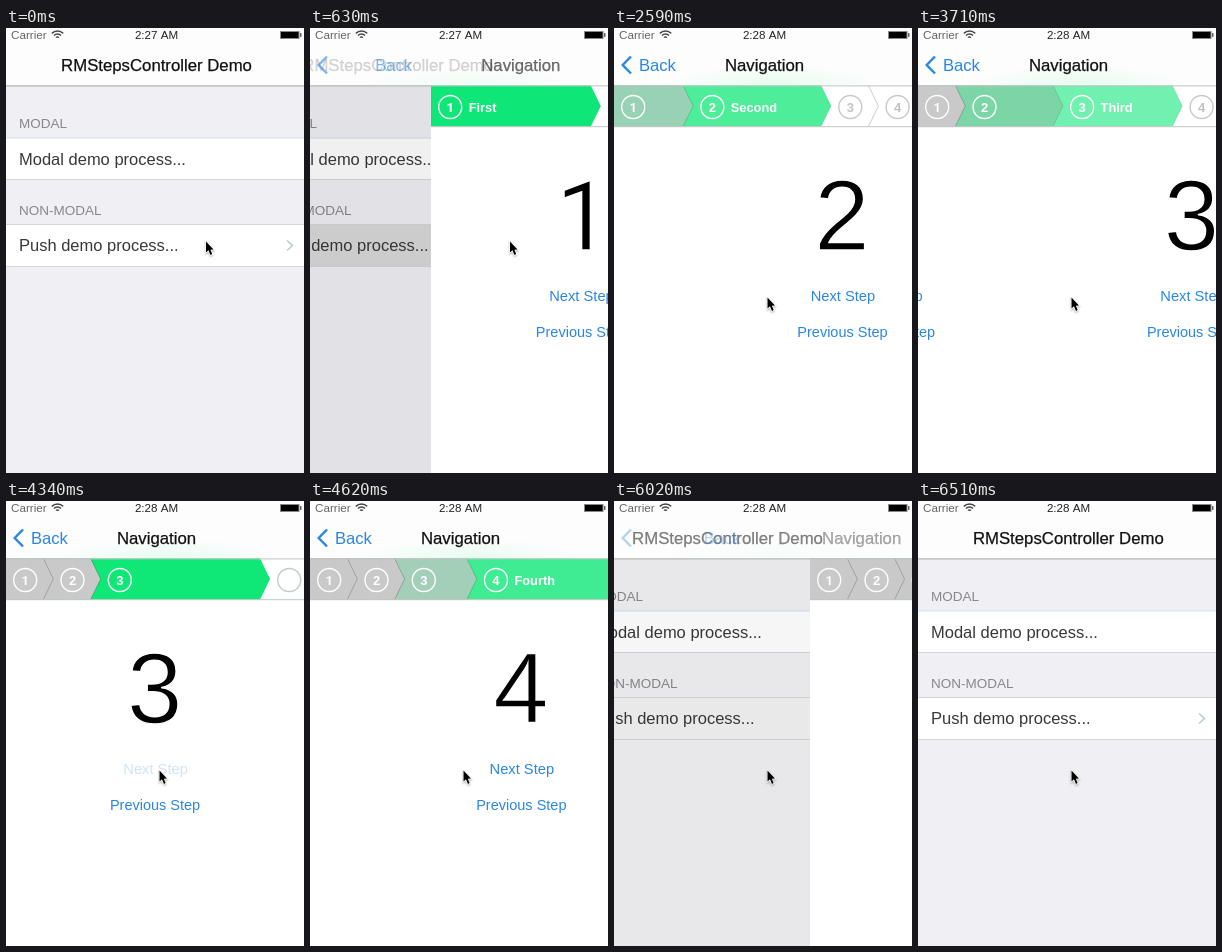
An HTML page with a canvas for the animation above (6.71 s loop, 298 by 445 pixels).

```html
<!DOCTYPE html>
<html lang="en">
<head>
<meta charset="utf-8">
<title>Steps demo</title>
<style>
html, body { margin: 0; width: 100%; height: 100%; overflow: hidden; background: #fff; }
canvas { display: block; width: 298px; height: 445px; }
</style>
</head>
<body>
<canvas id="stage"></canvas>
<script>
const W = 298, H = 445, PAGE = 302, LOOP = 6710, TICK = 70;
const BAR_TOP = 57.4, BAR_BOTTOM = 98.5;
const SANS = '"Liberation Sans", Arial, sans-serif', ROBOTO = 'Roboto, sans-serif';
const BLUE = '#2a86e2', WHITE = [255, 255, 255], GREEN = [14, 231, 119], GRAY = [201, 201, 201];
const LABELS = ['First', 'Second', 'Third', 'Fourth'];
const PRESS = [2240, 3360, 4200, 5670];
const RELEASE = [2313, 3476, 4325, 5850];
const PUSH = 475, POP = 5850, STEP_TIME = 420;

const canvas = document.getElementById('stage');
const scale = window.devicePixelRatio || 1;
canvas.width = W * scale;
canvas.height = H * scale;
const c = canvas.getContext('2d');

const clamp = x => Math.max(0, Math.min(1, x));
const ease = x => 0.5 - 0.5 * Math.cos(Math.PI * clamp(x));
const spring = ms => { const x = 0.013 * Math.max(0, ms); return 1 - (1 + x) * Math.exp(-x); };
const mix = (a, b, p) => a.map((v, i) => v + (b[i] - v) * p);
const rgb = a => `rgb(${a.map(Math.round)})`;

function rect(x, y, w, h, color) {
  c.fillStyle = color;
  c.fillRect(x, y, w, h);
}

function text(str, x, y, size, color, { align = 'left', weight = '', family = SANS, outline = 0, outlineColor = color } = {}) {
  c.font = `${weight} ${size}px ${family}`;
  c.textAlign = align;
  c.fillStyle = color;
  c.fillText(str, x, y);
  if (outline) {
    c.strokeStyle = outlineColor;
    c.lineWidth = outline;
    c.strokeText(str, x, y);
  }
}

function trace(points) {
  c.beginPath();
  points.forEach(([x, y]) => c.lineTo(x, y));
}

function line(points, color, width) {
  trace(points);
  c.strokeStyle = color;
  c.lineWidth = width;
  c.stroke();
}

// Runs a drawing with its own offset and opacity
function layer(x, y, alpha, draw) {
  c.save();
  c.translate(x, y);
  c.globalAlpha *= alpha;
  draw();
  c.restore();
}

function drawTable(highlight) {
  rect(0, 57, PAGE, H - 57, '#f0f0f4');
  rect(0, 110, PAGE, 41, '#fff');
  rect(0, 197, PAGE, 41, rgb(mix(WHITE, [217, 217, 217], highlight)));
  rect(0, 109.5, PAGE, 1, '#cfe0f0');
  for (const y of [151, 196, 238]) rect(0, y, PAGE, 1, '#d6d6da');
  text('MODAL', 13, 100, 13.5, '#88888c');
  text('Modal demo process...', 13, 136.5, 16.5, '#383838');
  text('NON-MODAL', 13, 186.7, 13.5, '#88888c');
  text('Push demo process...', 13, 223, 16.5, '#383838');
  line([[281, 212.5], [286.5, 217.5], [281, 222.5]], '#b9cccf', 1.6);
}

function drawSteps(pos) {
  const start = i => i && 47.3 * i + 122.5 * clamp(i - pos);
  const current = Math.ceil(pos);
  for (let i = 3; i >= 0; i--) {
    const d = i - pos, end = i < 3 ? start(i + 1) : 330;
    const edge = [[end - 10, BAR_TOP], [end, 78], [end - 10, BAR_BOTTOM]];
    trace([[0, BAR_TOP], ...edge, [0, BAR_BOTTOM]]);
    c.fillStyle = rgb(d > 0 ? mix(GREEN, WHITE, clamp(d)) : mix(GREEN, GRAY, clamp(-d)));
    c.fill();
    line(edge, `rgba(0,0,0,${0.2 * clamp(Math.abs(d))})`, 1);

    const x = start(i) + 19.2;
    c.beginPath();
    c.arc(x, 79, 11.5, 0, 7);
    c.strokeStyle = rgb(mix(WHITE, [200, 200, 200], clamp(2 * d - 1)));
    c.lineWidth = 1.4;
    c.stroke();
    text(i + 1, x, 83.7, 13, i <= current ? '#fff' : '#c2c2c2',
      { align: 'center', weight: 'bold', family: i ? SANS : ROBOTO });
    if (i === current) text(LABELS[i], x + 18.5, 83.7, 12.8, '#fff', { weight: 'bold' });
  }
  rect(0, BAR_BOTTOM - 0.3, PAGE, 1, '#c4c4c4');
}

function drawPage(t) {
  let pos = 0;
  for (let i = 0; i < 3; i++) pos += ease((t - RELEASE[i]) / STEP_TIME);
  rect(0, 57, PAGE, H - 57, '#fff');
  for (let i = 0; i < 4; i++) {
    if (Math.abs(i - pos) >= 1) continue;
    layer((i - pos) * PAGE, 0, 1, () => {
      const center = { align: 'center' };
      // A white outline thins the strokes to a light weight
      const light = { ...center, outline: 1.4, outlineColor: '#fff' };
      if (i) text(i + 1, 149.5, 222, 99.5, '#000', light);
      else text(1, 152, 222, 96.5, '#000', { ...light, family: ROBOTO });
      text('Previous Step', 150, 308.5, 14.5, BLUE, center);
      const lit = t < PRESS[i] ? 1 : 0.18 + 0.82 * clamp((t - RELEASE[i]) / 250);
      layer(0, 0, lit, () => text('Next Step', 150.5, 273, 14.7, BLUE, center));
    });
  }
  drawSteps(pos);
}

// Faint green showing through the translucent bar
function drawGlow() {
  c.scale(5.5, 1);
  const glow = c.createRadialGradient(0, 0, 0, 0, 0, 20);
  glow.addColorStop(0, 'rgba(14,231,119,.09)');
  glow.addColorStop(1, 'rgba(14,231,119,0)');
  rect(-20, -20, 40, 20, glow);
}

function drawBar(t, p) {
  rect(0, 0, W, 57, '#fdfdfd');
  layer(160, 57, p, drawGlow);
  rect(0, BAR_TOP, W, 1, '#c0c0c0');
  const title = { align: 'center', outline: 0.25 };
  layer(-105 * p, 0, clamp(1 - 1.4 * p), () => text('RMStepsController Demo', 150.5, 43, 16.75, '#111', title));
  layer(150 * (1 - p), 0, p, () => text('Navigation', 150.5, 43, 16.75, '#111', title));
  layer(0, 0, p, () => line([[17, 28.5], [8.7, 37], [17, 45.5]], BLUE, 2.4));
  layer(100 * (1 - p), 0, p, () => text('Back', 25, 43, 16.6, BLUE));

  text('Carrier', 5, 11, 11.7, '#666');
  text(t < 1400 ? '2:27 AM' : '2:28 AM', 150.5, 11, 11.6, '#222', { align: 'center' });
  for (const r of [2, 5, 8]) {
    c.beginPath();
    c.arc(51.5, 11, r, -2.36, -0.78);
    c.strokeStyle = '#444';
    c.lineWidth = 1.5;
    c.stroke();
  }
  rect(274, 3, 19.5, 8, '#888');
  rect(275, 4, 17.5, 6, '#000');
  rect(294, 5, 1.5, 4, '#666');
}

function drawCursor(t) {
  const p = ease((t - 1680) / 350);
  layer(200 - 46.5 * p, 213.5 + 56 * p, 1, () => {
    c.scale(0.88, 0.92);
    trace([[0, 0], [0, 12], [2.8, 9.6], [5, 14.6], [7, 13.7], [5, 8.9], [8.5, 8.7]]);
    c.closePath();
    c.shadowColor = 'rgba(0,0,0,.35)';
    c.shadowBlur = 2 * scale;
    c.shadowOffsetY = scale;
    c.strokeStyle = '#fff';
    c.lineWidth = 1.6;
    c.stroke();
    c.shadowColor = 'transparent';
    c.fillStyle = '#000';
    c.fill();
  });
}

function draw(now) {
  const t = Math.min(6510, Math.floor(now % LOOP / TICK) * TICK);
  const p = t < POP ? spring(t - PUSH) : 1 - spring(t - POP);
  const pageX = Math.round(PAGE * (1 - p));
  c.setTransform(scale, 0, 0, scale, 0, 0);
  layer(Math.round(-0.3 * PAGE * p), 0, 1, () => drawTable(t < 420 ? 0 : t < POP ? 1 : p));
  rect(0, 57, W, H - 57, `rgba(0,0,0,${0.1 * p})`);
  drawBar(t, p);
  if (pageX < W) layer(pageX, 0, 1, () => drawPage(t));
  rect(0, BAR_TOP, W, 1, '#c0c0c0');
  drawCursor(t);
}

let begin;
function tick(now) {
  begin ??= now;
  draw(now - begin);
  requestAnimationFrame(tick);
}
requestAnimationFrame(tick);
</script>
</body>
</html>
```
